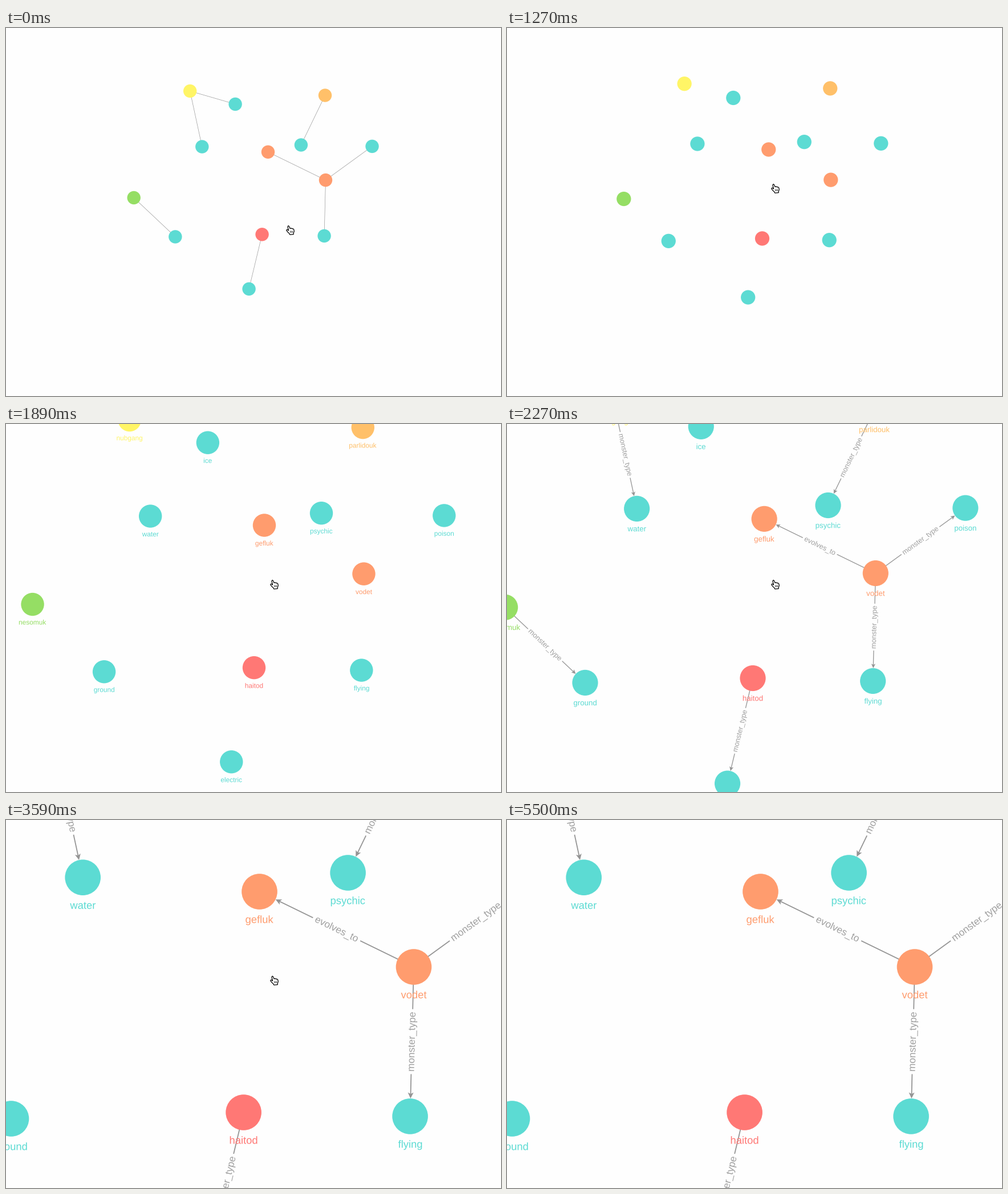
Animation, 868 px wide and 645 px high, one loop 6010 ms. Source, as a matplotlib script:

```python
import math

import numpy as np
import matplotlib.pyplot as plt
from matplotlib.animation import FuncAnimation
from matplotlib.collections import LineCollection
from matplotlib.patches import Circle, PathPatch, Polygon
from matplotlib.textpath import TextPath
from matplotlib.transforms import Affine2D

WIDTH, HEIGHT, DPI = 868, 645, 64
LOOP, TICK = 6010, 10
PT = 72 / DPI  # points per pixel

# The graph is laid out at full zoom, relative to the zoom centre.
CENTRE = (468.4, 272)
RADIUS = 31.3
NODE_FONT, EDGE_FONT = 18.4, 17.3
FONT = {"family": "Liberation Sans"}
GREY, LABEL_GREY = "#959595", "#a0a0a0"
TEAL, ORANGE = "#5cdbd3", "#ff9c6e"

NODES = {
    "nubgang": (-390.3, -432.5, "#fff566"),
    "ice": (-177.6, -371, TEAL),
    "parlidouk": (244, -412.3, "#ffc069"),
    "water": (-333.7, -171.3, TEAL),
    "gefluk": (-23.9, -146.5, ORANGE),
    "psychic": (131.2, -179.5, TEAL),
    "poison": (465, -173, TEAL),
    "vodet": (246.6, -14.5, ORANGE),
    "nesomuk": (-654, 68.3, "#95de64"),
    "ground": (-459.4, 251.5, TEAL),
    "haitod": (-51.8, 240.5, "#ff7875"),
    "flying": (240.2, 247.4, TEAL),
    "electric": (-113.4, 496.4, TEAL),
}
EDGES = [
    ("vodet", "gefluk", "evolves_to"),
    ("vodet", "poison", "monster_type"),
    ("vodet", "flying", "monster_type"),
    ("nubgang", "ice", "monster_type"),
    ("nubgang", "water", "monster_type"),
    ("parlidouk", "psychic", "monster_type"),
    ("nesomuk", "ground", "monster_type"),
    ("haitod", "electric", "monster_type"),
]

# Bursts of wheel steps: start ms, end ms, steps, first zoom, last zoom
ZOOMS = [
    (0, 0, 1, 0.3734, 0.3734),
    (1270, 1610, 8, 0.403, 0.5435),
    (1660, 1830, 4, 0.562, 0.622),
    (1890, 2060, 4, 0.645, 0.7214),
    (2930, 3100, 4, 0.749, 0.839),
    (3160, 3180, 2, 0.869, 0.9),
    (3330, 3410, 3, 0.933, 1.0),
]
EDGES_HIDDEN = [(1270, 2270), (2930, 3590)]
DETAIL_ZOOM = 8 / NODE_FONT  # labels need at least 8 px

# Pointer moves: start ms, end ms, steps, way points
MOVES = [
    (30, 430, 12, [(491, 346), (463, 273)]),
    (4400, 4640, 9, [(463, 273), (822, 621)]),
    (4850, 5360, 20, [(822, 621), (835, 629), (670, 481), (780, 552)]),
    (5480, 5480, 1, [(780, 552), (829, 628)]),
]
POINTER_GONE = 5500

zoom_times = np.concatenate([np.linspace(a, b, n) for a, b, n, _, _ in ZOOMS])
zoom_levels = np.concatenate([np.geomspace(p, q, n) for _, _, n, p, q in ZOOMS])


def zoom_at(t):
    return zoom_levels[np.searchsorted(zoom_times, t + 0.5) - 1]


def pointer_at(t):
    pos = MOVES[0][3][0]
    for start, end, steps, points in MOVES:
        if t < start:
            break
        done = np.searchsorted(np.linspace(start, end, steps), t + 0.5) / steps
        eased = done * done * (3 - 2 * done)
        knots = np.linspace(0, 1, len(points))
        pos = [np.interp(eased, knots, axis) for axis in zip(*points)]
    return pos


fig = plt.figure(figsize=(WIDTH / DPI, HEIGHT / DPI), dpi=DPI, facecolor="#fefefe")
ax = fig.add_axes([0, 0, 1, 1])
ax.set_xlim(0, WIDTH)
ax.set_ylim(HEIGHT, 0)
ax.axis("off")

view = Affine2D()
to_stage = view + ax.transData
hand = Affine2D()
to_hand = hand + ax.transData


def add_label(text, size, x, y, color, angle=0.0, drop=0.0, zorder=4):
    """Centre text on (x, y), its baseline `drop` below; return patch and width."""
    path = TextPath((0, 0), text, size=size, prop=FONT)
    box = path.get_extents()
    place = (Affine2D().translate(-(box.x0 + box.x1) / 2, -drop).scale(1, -1)
             .rotate(angle).translate(x, y))
    patch = PathPatch(place.transform_path(path), fc=color, lw=0,
                      transform=to_stage, zorder=zorder)
    ax.add_artist(patch)
    return patch, box.width


def add_lines(segments):
    lines = LineCollection(segments, colors=GREY, transform=to_stage, zorder=1)
    ax.add_collection(lines, autolim=False)
    return lines


node_labels = []
for name, (x, y, color) in NODES.items():
    ax.add_artist(Circle((x, y), RADIUS, fc=color, lw=0, transform=to_stage, zorder=3))
    node_labels.append(add_label(name, NODE_FONT, x, y, color, drop=55)[0])

plain_segments, cut_segments, edge_details = [], [], []
for source, target, text in EDGES:
    a, b = (np.array(NODES[name][:2]) for name in (source, target))
    mid, along = (a + b) / 2, (b - a) / math.dist(a, b)
    across = np.array([-along[1], along[0]])
    label, width = add_label(text, EDGE_FONT, *mid, LABEL_GREY,
                             angle=math.atan(along[1] / along[0]), drop=5, zorder=2)
    gap = along * (width / 2 + 5.5)
    tip = b - along * RADIUS
    back = tip - along * 10.5
    arrow = Polygon([tip, back + across * 5, tip - along * 8, back - across * 5],
                    fc=GREY, lw=0, transform=to_stage, zorder=2)
    ax.add_artist(arrow)
    plain_segments.append((a, b))
    cut_segments += [(a, mid - gap), (mid + gap, tip - along * 7)]
    edge_details += [label, arrow]

plain_lines = add_lines(plain_segments)
cut_lines = add_lines(cut_segments)

OUTLINE = [(3.3, 1.2), (4.5, 0.7), (5.5, 1.8), (7, 5.4), (8.2, 4.8), (9.4, 5.5),
           (10.6, 5.1), (11.5, 6.1), (12.8, 6), (13.8, 7.4), (14.3, 10.5),
           (13.2, 13), (13.2, 15.6), (6.8, 16.2), (5.6, 14), (3, 11.6),
           (0.8, 8.7), (1.4, 7.3), (3, 7.5), (4.5, 9), (3.1, 3.2)]
pointer = [
    Polygon(OUTLINE, fc="white", ec="black", lw=1.25 * PT, joinstyle="round",
            transform=to_hand, zorder=6),
    LineCollection([[(x, 9.6), (x + 0.2, 12.8)] for x in (7.6, 9.5, 11.4)],
                   colors="black", linewidths=0.8 * PT, transform=to_hand, zorder=7),
]
for part in pointer:
    ax.add_artist(part)


def show(artists, visible):
    for artist in artists:
        artist.set_visible(visible)


def update(frame):
    t = frame * TICK
    zoom = zoom_at(t)
    view.clear().scale(zoom).translate(*CENTRE)
    hand.clear().translate(*pointer_at(t))

    detailed = zoom >= DETAIL_ZOOM
    linked = not any(start <= t < end for start, end in EDGES_HIDDEN)
    show(node_labels, detailed)
    show(edge_details + [cut_lines], linked and detailed)
    show([plain_lines], linked and not detailed)
    show(pointer, t < POINTER_GONE)
    for lines in (plain_lines, cut_lines):
        lines.set_linewidth(1.8 * zoom * PT)
    return []


anim = FuncAnimation(fig, update, frames=LOOP // TICK, interval=TICK,
                     repeat=True, repeat_delay=0, blit=False)
plt.show()
```
